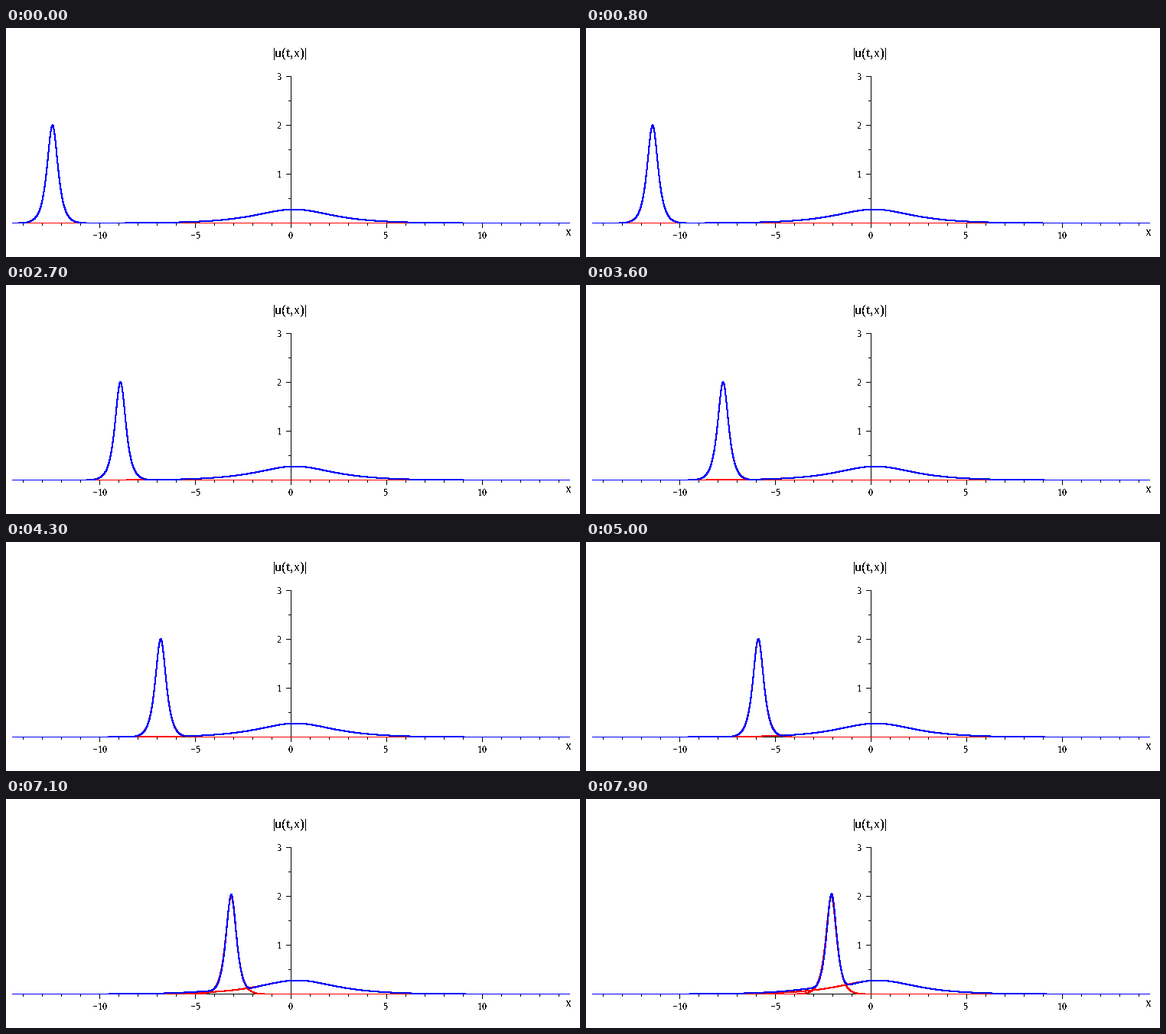
Recreate the animation shown at these times as a matplotlib script. Size 750 by 300 pixels, loop 8000 ms.

```python
import numpy as np
import matplotlib.pyplot as plt
from matplotlib.animation import FuncAnimation

W, H, DPI = 750, 300, 100
FRAMES, INTERVAL = 80, 100
X0, Y0, UNIT_X, UNIT_Y = 372.75, 255.75, 25, 64.15
FLOOR = int(Y0)
RED, BLUE = (255, 0, 0, 255), (0, 0, 255, 255)

# Complex mKdV solitons: height k/2, speed k^2, constant relative phase
K1, K2, PHASE = 4.0, 0.566, 1.17
START1, START2 = -12.48, 0.12
DT = 0.1315 / K1**2
SHIFT = np.log((K1 + K2) / (K1 - K2))

plt.rcParams.update({
    "font.family": "Liberation Serif",
    "text.antialiased": False,
    "text.hinting": "native",
    "text.hinting_factor": 1,
})

fig = plt.figure(figsize=(W / DPI, H / DPI), dpi=DPI, facecolor="white")
ax = fig.add_axes([0, 0, 1, 1])
ax.axis("off")
canvas = ax.imshow(np.zeros((H, W, 4), np.uint8), extent=(0, W, H, 0),
                   interpolation="nearest", aspect="auto", zorder=3)
ax.set_xlim(0, W)
ax.set_ylim(H, 0)

x = np.linspace(-14.54, 14.54, 14541)


def px(v):
    return X0 + UNIT_X * v


def py(v):
    return Y0 - UNIT_Y * v


def points(pixels):
    return pixels * 72 / DPI


def stroke(xs, ys):
    """One-pixel black line through whole pixels."""
    ax.plot(np.floor(xs) + 0.5, np.floor(ys) + 0.5, color="black",
            lw=points(1), snap=False, solid_capstyle="projecting", zorder=1)


def label(cx, cy, text, size, **kw):
    ax.text(cx, cy, text, fontsize=points(size), va="center_baseline",
            **{"ha": "center", **kw})


def trace(img, u, color):
    """Draw a curve with a 2x2 pixel pen, clipped at the x axis."""
    col = np.rint(px(x)).astype(int)
    row = np.rint(py(u)).astype(int)
    for dx in (-1, 0):
        for dy in (-1, 0):
            keep = row + dy <= FLOOR
            img[(row + dy)[keep], (col + dx)[keep]] = color


def soliton(k, center):
    return k / 2 / np.cosh(k * (x - center))


def two_soliton(c1, c2):
    """Modulus of the two-soliton solution with incoming centers c1, c2."""
    g1 = np.exp(K1 * (x - c1) - SHIFT)
    g2 = np.exp(K2 * (x - c2) + SHIFT + 1j * PHASE)
    h2 = np.conj(g2)
    m11 = (1 / g1 + g1) / (2 * K1)
    m12 = (1 / g1 + h2) / (K1 + K2)
    m21 = (1 / g2 + g1) / (K1 + K2)
    m22 = (1 / g2 + h2) / (2 * K2)
    q = (m11 + m22 - m12 - m21) / (m11 * m22 - m12 * m21)
    return np.abs(q) / 2


# Axes, ticks and labels
stroke([px(x[0]), px(x[-1])], [Y0, Y0])
stroke([X0, X0], [py(3), Y0])
for i in range(-14, 15):
    major = i % 5 == 0
    stroke([px(i)] * 2, [Y0, Y0 + (6 if major else 3)])
    if major:
        label(px(i) - (1 if i >= 0 else 0), 272, str(i).replace("-", "\u2212"), 13)
for i in range(1, 7):
    major = i % 2 == 0
    stroke([X0 - (6 if major else 3), X0], [py(i / 2)] * 2)
    if major:
        label(360, np.floor(py(i / 2)) + 0.5, str(i // 2), 13, ha="right")
label(371.5, 32, "|u(t,x)|", 18)
label(735, 266, "x", 18)


def update(n):
    c1 = START1 + K1**2 * DT * n
    c2 = START2 + K2**2 * DT * n
    img = np.zeros((H, W, 4), np.uint8)
    trace(img, soliton(K1, c1), RED)
    trace(img, soliton(K2, c2), RED)
    trace(img, two_soliton(c1, c2), BLUE)
    canvas.set_data(img)
    return (canvas,)


anim = FuncAnimation(fig, update, frames=FRAMES, interval=INTERVAL,
                     repeat=True, repeat_delay=0, blit=False)
plt.show()
```
